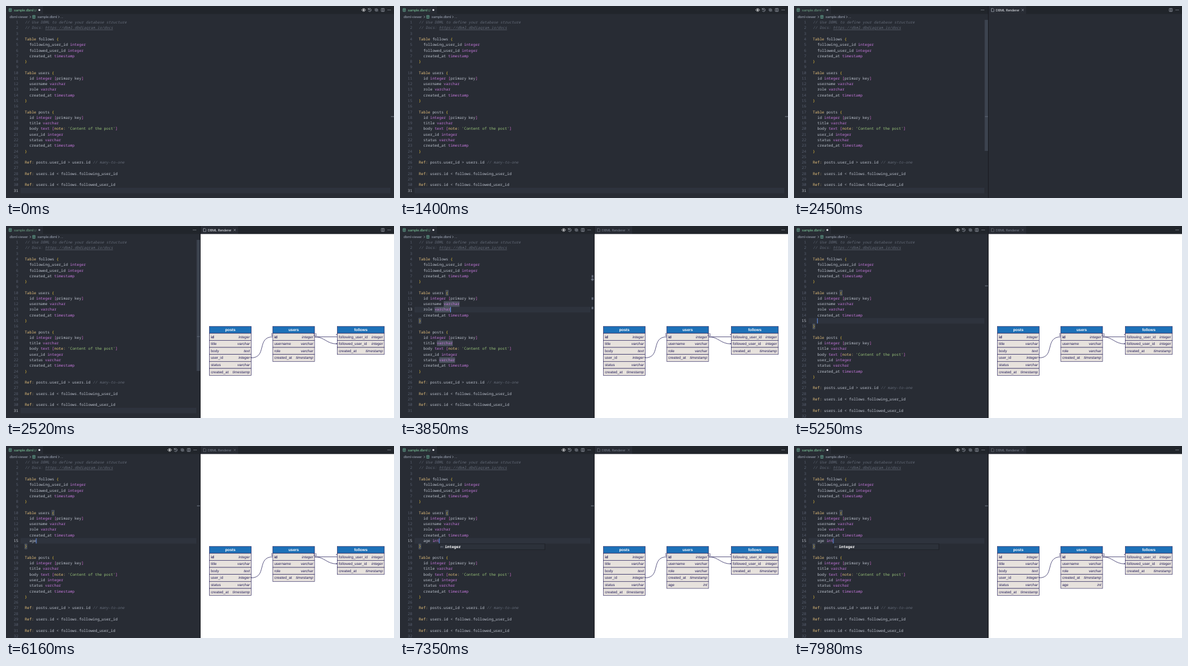
Recreate the animation shown at these times as an HTML page. Size 640 by 318 pixels, loop 8000 ms.

```html
<!DOCTYPE html>
<html lang="en">
<head>
<meta charset="utf-8">
<title>DBML preview</title>
<style>
  html, body { margin: 0; width: 100%; height: 100%; overflow: hidden; background: #282c34; }
  svg { display: block; width: 100vw; height: 100vh; }
  text { white-space: pre; text-rendering: geometricPrecision; }
  .code { font: 6.225px "Noto Sans Mono", "DejaVu Sans Mono", monospace; fill: #bcc2cd; }
  .ui { font: 5.6px Roboto, "Open Sans", sans-serif; fill: #9da5b4; }
  .db { font: 6.2px "Liberation Sans", Arial, sans-serif; fill: #29235c; }
  .head { font-size: 6.4px; font-weight: bold; fill: #fff; text-anchor: middle; }
  .type { font-style: italic; text-anchor: end; }
  .num { fill: #596070; text-anchor: end; }
  .num.on { fill: #c5cad3; }
  .comment { fill: #646b78; font-style: italic; }
  .link { text-decoration: underline; }
  .string { fill: #98c379; }
  .key { fill: #e5c07b; }
  .kind { fill: #c678dd; }
  .brace { fill: #f0c93a; }
  .square { fill: #da70d6; }
  .icon { fill: none; stroke: #a9afba; stroke-width: .7; }
</style>
</head>
<body>
<svg id="stage" viewBox="0 0 640 318" preserveAspectRatio="none"></svg>
<script>
const LOOP = 8000, CHAR = 3.735, ROW = 9.283, TOP = 22.5, LEFT = 31;
const stage = document.getElementById('stage');

const SOURCE = `// Use DBML to define your database structure
// Docs: https://dbml.dbdiagram.io/docs

Table follows {
  following_user_id integer
  followed_user_id integer
  created_at timestamp
}

Table users {
  id integer [primary key]
  username varchar
  role varchar
  created_at timestamp
}

Table posts {
  id integer [primary key]
  title varchar
  body text [note: 'Content of the post']
  user_id integer
  status varchar
  created_at timestamp
}

Ref: posts.user_id > users.id // many-to-one

Ref: users.id < follows.following_user_id

Ref: users.id < follows.followed_user_id
`.split('\n');

// Each step adds to the state before it.
const STEPS = [
  [0, { line: 31, focus: 'left' }],
  [2100, { hover: true }],
  [2310, { hover: false, split: true, focus: 'right', slider: true }],
  [2520, { drawn: true }],
  [2730, { slider: false }],
  [3430, { focus: 'left', line: 13, caret: 3430 }],
  [3640, { word: 'varchar' }],
  [4620, { line: 14, word: '', caret: 4620 }],
  [4760, { word: 'timestamp' }],
  [5180, { line: 15, word: '', typed: '', caret: 5180 }],
  [5670, { typed: 'a', caret: 5670 }],
  [5810, { typed: 'ag', caret: 5810 }],
  [5950, { typed: 'age', caret: 5950 }],
  [6580, { typed: 'age ', caret: 6580 }],
  [6650, { typed: 'age i', caret: 6650 }],
  [6790, { typed: 'age in', caret: 6790, popup: true }],
  [6930, { typed: 'age int', caret: 6930 }],
  [7140, { age: true }]
];

const esc = s => s.replace(/&/g, '&amp;').replace(/</g, '&lt;').replace(/>/g, '&gt;');
const rect = (x, y, w, h, fill, more = '') =>
  `<rect x="${x}" y="${y}" width="${w}" height="${h}" fill="${fill}" ${more}/>`;
const text = (x, y, cls, body, more = '') =>
  `<text x="${x}" y="${y}" class="${cls}" ${more}>${body}</text>`;
const path = (d, more = '') => `<path d="${d}" class="icon" ${more}/>`;
const rowTop = n => TOP + (n - 1) * ROW;
const colX = c => LEFT + c * CHAR;
const markY = n => 23 + (n - .5) * 5.25;

const TOKEN = /(\/\/.*)|('[^']*')|\b((?:Table|Ref|note)\b:?)|\b(integer|varchar|timestamp|text|int)\b|([{}])|([\[\]])/g;
const NAMES = ['comment', 'string', 'key', 'kind', 'brace', 'square'];

function paint(line) {
  let out = '', at = 0;
  for (const m of line.matchAll(TOKEN)) {
    const i = NAMES.findIndex((_, k) => m[k + 1]);
    let body = esc(m[0]);
    if (!i) body = body.replace(/https:.*/, '<tspan class="link">$&</tspan>');
    out += esc(line.slice(at, m.index)) + `<tspan class="${NAMES[i]}">${body}</tspan>`;
    at = m.index + m[0].length;
  }
  return out + esc(line.slice(at));
}

const fileIcon = (x, y) =>
  path(`M${x - 2} ${y - 2.4}h4v4.8h-4z M${x - 2} ${y - .7}h4 M${x} ${y - .7}v3`, 'style="stroke:#6fb8a0"');
const dots = x => [-2, 0, 2].map(d => `<circle cx="${x + d}" cy="6.6" r=".55" fill="#a9afba"/>`).join('');
const cross = (x, on) =>
  path(`M${x - 1.6} 5l3.2 3.2m0-3.2l-3.2 3.2`, `opacity="${on ? 1 : .45}"`);
const splitIcon = x => path(`M${x - 2.4} 4.2h4.8v4.8h-4.8z M${x} 4.2v4.8`);

function actions(end) {
  const [eye, hist, diff] = [end - 50, end - 40, end - 29];
  return path(`M${eye - 3.2} 6.6Q${eye} 1.8 ${eye + 3.2} 6.6Q${eye} 11.4 ${eye - 3.2} 6.6z`, 'style="stroke:#fff"') +
    `<circle cx="${eye}" cy="6.6" r="1.2" fill="#fff"/>` +
    path(`M${hist - 2.4} 5.4a2.6 2.6 0 1 1-.1 2.2 M${hist - 2.6} 3.6v2h2 M${hist} 5v1.8l1.3 .8`) +
    path(`M${diff - 2} 4v4h2.4 M${diff + 2} 9.2v-4h-2.4 M${diff - .4} 6.8l1.2 1.2-1.2 1.2 M${diff + .4} 4l-1.2 1.2 1.2 1.2`) +
    splitIcon(end - 18.5) + dots(end - 8);
}

function chrome(s) {
  const left = s.focus === 'left', edge = s.split ? 320 : 640;
  let out = rect(0, 0, 640, 13.3, '#21252b') + rect(0, 0, 61, 13.3, '#282c34') + fileIcon(7, 6.6) +
    text(13, 8.6, 'ui', 'sample.dbml', `style="fill:${left ? '#7fca9c' : '#6a9c80'}"`) +
    text(46.3, 8.6, 'ui', 'U', `style="fill:${left ? '#62a37c' : '#547d67'}"`) +
    `<circle cx="55" cy="6.6" r="1.6" fill="${left ? '#e4e7ec' : '#8b919c'}"/>`;
  if (s.hover) out += rect(585, 1.8, 10, 9.8, '#3a404b', 'rx="2"');
  out += left ? actions(edge) : dots(edge - 9);
  out += text(6, 20, 'ui', 'dbml-viewer') + path('M39.3 16.4l1.6 1.7-1.6 1.7') + fileIcon(46, 18) +
    text(52, 20, 'ui', 'sample.dbml') + path('M86.3 16.4l1.6 1.7-1.6 1.7') + text(90, 20, 'ui', '...');
  return out;
}

function editor(s) {
  const lines = SOURCE.slice(), edge = s.split ? 320 : 640;
  const typing = s.typed !== undefined;
  if (typing) lines.splice(14, 0, '  ' + s.typed);
  let out = rect(24, rowTop(s.line), edge - 30, ROW, '#2e333d');
  if (s.caret) {
    for (const [c, n] of [[12, 10], [0, typing ? 16 : 15]])
      out += rect(colX(c), rowTop(n) + .4, CHAR, ROW - .8, '#3a414d', 'stroke="#6b7484" stroke-width=".5"');
  }
  lines.forEach((line, i) => {
    const n = i + 1, y = rowTop(n) + 6.6;
    const at = s.word ? line.indexOf(s.word) : -1;
    if (at >= 0) {
      out += rect(colX(at), rowTop(n), s.word.length * CHAR, ROW, '#4b515e');
      out += rect(edge - 4, markY(n) - 2, 3, 4, '#5d6472');
    }
    out += text(20.2, y, n === s.line ? 'code num on' : 'code num', n) + text(LEFT, y, 'code', paint(line));
  });
  out += rect(edge - 5, markY(s.line) - .5, 5, 1, '#747b88');
  if (s.slider) out += rect(314.5, 23, 5.5, 217, '#4e5666', 'opacity=".55"');
  if (s.caret && s.blink) out += rect(colX(lines[s.line - 1].length) - .2, rowTop(s.line) + .3, .9, ROW - .6, '#6a9bff');
  if (s.popup) {
    out += rect(65, 162, 174, 9.8, '#2c313a', 'stroke="#1b1e23" stroke-width=".7"') +
      text(66.6, 168.3, 'ui', 'abc', 'style="font-size:3.2px"') +
      text(74, 168.9, 'code', 'integer', 'style="fill:#fff;font-weight:bold"');
  }
  return out;
}

function table(x, w, name, fields) {
  const y = 166.2, h = 11.62, bold = f => f[0] === 'id' ? 'style="font-weight:bold"' : '';
  const line = 'stroke="#29235c" stroke-width=".65"';
  let out = rect(x, y, w, h, '#1d71b8', line) + text(x + w / 2, y + 8, 'db head', name);
  fields.forEach((f, i) => {
    const top = y + h * (i + 1);
    out += rect(x, top, w, h, '#e7e2dd', line) + text(x + 2.4, top + 7.8, 'db', f[0], bold(f)) +
      text(x + w - 2.2, top + 7.8, 'db type', f[1]);
  });
  return out;
}

function diagram(s) {
  const made = ['created_at', 'timestamp'], id = ['id', 'integer'];
  const users = [id, ['username', 'varchar'], ['role', 'varchar'], made];
  if (s.age) users.push(['age', 'int']);
  const edge = d => `<path d="${d}" fill="none" stroke="#29235c" stroke-width=".75"/>`;
  return rect(321, 13.3, 319, 304.7, '#fff') +
    table(335.5, 69, 'posts', [id, ['title', 'varchar'], ['body', 'text'], ['user_id', 'integer'], ['status', 'varchar'], made]) +
    table(440, 69, 'users', users) +
    table(546.5, 77.5, 'follows', [['following_user_id', 'integer'], ['followed_user_id', 'integer'], made]) +
    edge('M404.5 218.3C431 218.3 413 183.6 440 183.6') +
    edge('M509 183.6H546.5') + edge('M509 183.6C526 183.6 528 195.3 546.5 195.3') +
    text(437, 182.2, 'db', '1') + text(506.8, 182.2, 'db', '1') + text(509.6, 182.2, 'db', '1') +
    text(403, 221.3, 'db', '*') + text(544, 183, 'db', '*') + text(544, 198, 'db', '*');
}

function preview(s) {
  const on = s.focus === 'right';
  return rect(320, 0, 320, 318, '#282c34') + rect(320, 0, 320, 13.3, '#21252b') +
    rect(321, 0, 62, 13.3, '#282c34') +
    path('M325.5 4.2h3l1.4 1.4v3.6h-4.4z', `opacity="${on ? 1 : .5}"`) +
    text(333, 8.6, 'ui', 'DBML Renderer', `style="fill:${on ? '#e1e4e9' : '#747b88'}"`) +
    cross(377.3, on) + (on ? splitIcon(621.5) : '') + dots(632) +
    (s.drawn ? diagram(s) : '') + rect(320, 0, .9, 318, '#181a1f');
}

let last = '';
function frame() {
  const t = performance.now() % LOOP;
  const s = Object.assign({}, ...STEPS.filter(p => p[0] <= t).map(p => p[1]));
  s.blink = s.caret ? (t - s.caret) % 1000 < 500 : false;
  const key = JSON.stringify(s);
  if (key !== last) {
    last = key;
    stage.innerHTML = rect(0, 0, 640, 318, '#282c34') + chrome(s) + editor(s) + (s.split ? preview(s) : '');
  }
  requestAnimationFrame(frame);
}
frame();
</script>
</body>
</html>
```
